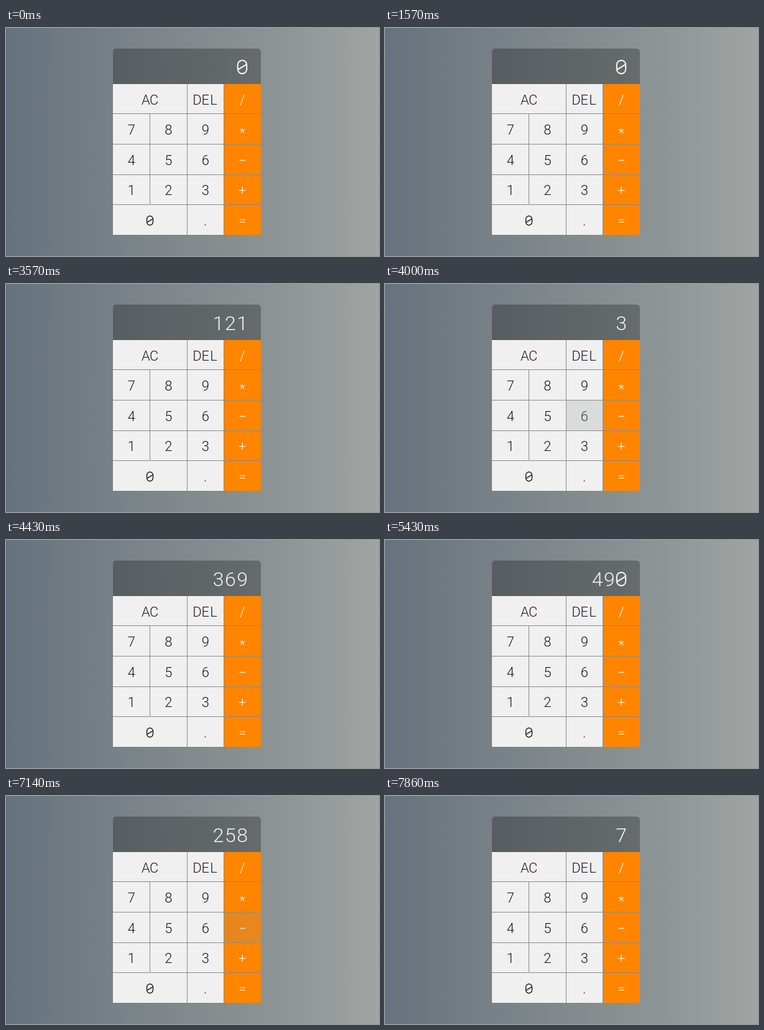
These frames come from a looping animation (600 px wide and 366 px high, 8000 ms). An HTML page with a canvas:

```html
<!DOCTYPE html>
<html lang="en">
<head>
<meta charset="utf-8">
<title>Calculator</title>
<style>
  html, body { margin: 0; width: 100%; height: 100%; overflow: hidden; background: #7f888c; }
  canvas { display: block; }
</style>
</head>
<body>
<canvas id="stage" width="600" height="366"></canvas>
<script>
const ctx = document.getElementById('stage').getContext('2d');
const LOOP = 8000;
const COLS = [172, 231.5, 291, 350.5, 410];
const ROWS = [90, 138, 187, 236, 284, 332];
const LAYOUT = [
  ['AC', 'AC', 'DEL', '/'],
  ['7', '8', '9', '*'],
  ['4', '5', '6', '-'],
  ['1', '2', '3', '+'],
  ['0', '0', '.', '=']
];

// [time, display text, pressed key]
const STATES = [
  [0, '0'],
  [2000, '0', '1'], [2140, '1'], [2290, '1', '2'], [2430, '12', '1'], [2570, '121'],
  [3140, '121', '+'], [3290, '121'],
  [3710, '121', '3'], [3860, '3'], [4000, '3', '6'], [4140, '36'],
  [4290, '36', '9'], [4430, '369'], [5000, '490'],
  [5290, '490', '-'], [5430, '490'],
  [6000, '2'], [6290, '25'], [6710, '258'],
  [7140, '258', '-'], [7290, '258'],
  [7710, '258', '7'], [7860, '7']
];

const background = ctx.createLinearGradient(0, 0, 600, 0);
background.addColorStop(0, '#66727d');
background.addColorStop(0.25, '#757f85');
background.addColorStop(0.75, '#8f9595');
background.addColorStop(1, '#a0a5a3');

function line(x1, y1, x2, y2) {
  ctx.beginPath();
  ctx.moveTo(x1, y1);
  ctx.lineTo(x2, y2);
  ctx.stroke();
}

function slashedZero(x, baseline, size) {
  const w = size * 0.45, h = size * 0.67, top = baseline - size * 0.69;
  ctx.lineWidth = size * 0.065;
  ctx.beginPath();
  ctx.roundRect(x - w / 2, top, w, h, w / 2);
  ctx.stroke();
  line(x - w * 0.43, top + h * 0.68, x + w * 0.43, top + h * 0.32);
}

function glyph(char, x, baseline, size) {
  if (char === '0') return slashedZero(x, baseline, size);
  if (char === '-') {
    ctx.lineWidth = 1.4;
    return line(x - 4.5, baseline - 7.5, x + 4.5, baseline - 7.5);
  }
  ctx.fillText(char, x, baseline + (char === '*' ? 5 : 0));
}

// Sets each character in a fixed-pitch cell of 0.6 em.
function monoText(text, centre, baseline, size, color) {
  ctx.font = `300 ${size}px Roboto, sans-serif`;
  ctx.textAlign = 'center';
  ctx.fillStyle = ctx.strokeStyle = color;
  const pitch = size * 0.6;
  [...text].forEach((char, i) =>
    glyph(char, centre + (i - (text.length - 1) / 2) * pitch, baseline, size));
}

function drawKey(label, row, col, span, pressed) {
  const left = COLS[col], right = COLS[col + span];
  const top = ROWS[row], bottom = ROWS[row + 1];
  const operator = col === 3;
  ctx.globalAlpha = pressed ? 0.8 : 1;
  ctx.fillStyle = operator ? '#ff8500' : '#f0f0f0';
  ctx.fillRect(Math.floor(left), top, Math.floor(right) - Math.floor(left), bottom - top);
  monoText(label, (left + right) / 2, Math.round(122.7 + 48.55 * row), 22,
    operator ? '#fff4e4' : '#21161f');
  ctx.globalAlpha = 1;
  ctx.fillStyle = '#8a8a88';
  if (col + span < 4) ctx.fillRect(Math.floor(right), top, 1, bottom - top);
  if (row < 4) ctx.fillRect(left, bottom - 1, right - left, 1);
}

function drawKeys(pressed) {
  LAYOUT.forEach((labels, row) => {
    for (let col = 0; col < 4;) {
      const label = labels[col];
      const span = labels[col + 1] === label ? 2 : 1;
      drawKey(label, row, col, span, label === pressed);
      col += span;
    }
  });
  // Dividers stay above the neighbouring key faces.
  ctx.fillStyle = '#8a8a88';
  ctx.fillRect(231, 138, 1, 145);
  ctx.fillRect(291, 90, 1, 242);
  ctx.fillRect(350, 90, 1, 242);
}

function drawDisplay(text) {
  ctx.fillStyle = 'rgba(0, 0, 0, 0.27)';
  ctx.beginPath();
  ctx.roundRect(172, 33, 238, 57, [5, 5, 0, 0]);
  ctx.fill();
  const size = 32;
  monoText(text, 380 - (text.length - 1) * size * 0.3, 74, size, '#f3f3f0');
}

function frame() {
  const time = performance.now() % LOOP;
  const [, text, pressed] = STATES.findLast(([start]) => start <= time);
  ctx.fillStyle = background;
  ctx.fillRect(0, 0, 600, 366);
  drawDisplay(text);
  drawKeys(pressed);
  requestAnimationFrame(frame);
}
frame();
</script>
</body>
</html>
```
